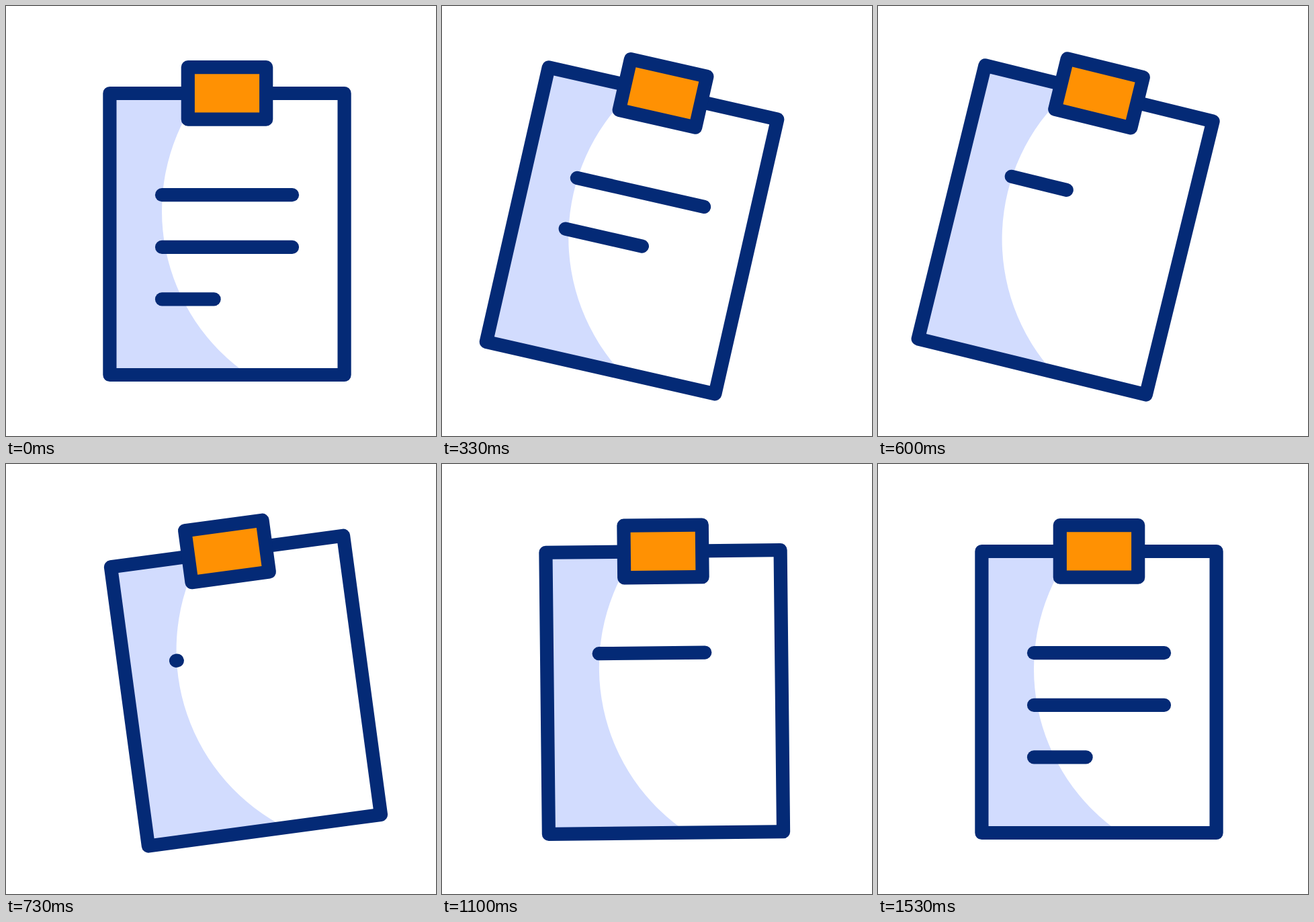
Recreate the animation shown at these times as an HTML page. Size 640 by 640 pixels, loop 2 s.

```html
<!DOCTYPE html>
<html lang="en">
<head>
<meta charset="utf-8">
<title>Clipboard</title>
<style>
  html, body { margin: 0; width: 100%; height: 100%; overflow: hidden; background: #fff; }
  svg { display: block; width: 100vw; height: 100vh; }
  .ink { stroke: #042a76; stroke-width: 20.2; stroke-linecap: round; stroke-linejoin: round; }
</style>
</head>
<body>
<svg viewBox="0 0 640 640">
  <defs>
    <clipPath id="sheet"><rect x="154.4" y="130" width="349.2" height="419"/></clipPath>
  </defs>
  <g id="board">
    <g clip-path="url(#sheet)">
      <rect x="154" y="130" width="350" height="419" fill="#d2dcfe"/>
      <circle cx="527.6" cy="305" r="295.6" fill="#fff"/>
    </g>
    <rect class="ink" x="154.4" y="130" width="349.2" height="419" fill="none"/>
    <rect class="ink" x="270.8" y="91.1" width="116.4" height="77.6" fill="#ff9103"/>
    <line class="ink" x1="232" y1="281.2" x2="426" y2="281.2"/>
    <line class="ink" x1="232" y1="358.8" x2="426" y2="358.8"/>
    <line class="ink" x1="232" y1="436.4" x2="309.6" y2="436.4"/>
  </g>
</svg>
<script>
const LOOP = 2000, FPS = 30, LEFT = 232;
const board = document.getElementById('board');
const lines = board.querySelectorAll('line');

// cubic-bezier(x1, 0, x2, 1), solved by bisection
function bezier(x1, x2) {
  return x => {
    let lo = 0, hi = 1, u = x;
    for (let i = 0; i < 24; i++) {
      u = (lo + hi) / 2;
      const bx = 3 * x1 * u * (1 - u) ** 2 + 3 * x2 * u * u * (1 - u) + u ** 3;
      if (bx < x) lo = u; else hi = u;
    }
    return u * u * (3 - 2 * u);
  };
}
const swingEase = bezier(0.415, 0.6);
const trimEase = bezier(1 / 3, 2 / 3);

// [time, value] steps
const swing = [[0, 0], [533, 18.4], [767, -8.9], [967, 4.9], [1167, -2.4], [1367, 1.3], [1533, 0]];
const trims = [
  { full: 194, steps: [[419, 1], [752, 0], [786, 0], [1220, 1]] },
  { full: 194, steps: [[190, 1], [523, 0], [1100, 0], [1433, 1]] },
  { full: 77.6, steps: [[0, 1], [333, 0], [1267, 0], [1533, 1]] }
];

function valueAt(steps, t, ease) {
  if (t <= steps[0][0]) return steps[0][1];
  for (let i = 1; i < steps.length; i++) {
    const [t0, a] = steps[i - 1], [t1, b] = steps[i];
    if (t < t1) return a + (b - a) * ease((t - t0) / (t1 - t0));
  }
  return steps[steps.length - 1][1];
}

function draw(now) {
  // motion runs in steps of 1/30 s
  const t = Math.floor((now % LOOP + 3.4) * FPS / 1000) * 1000 / FPS % LOOP;
  board.setAttribute('transform', `rotate(${valueAt(swing, t, swingEase).toFixed(3)} 329 130)`);
  trims.forEach(({ full, steps }, i) => {
    const part = valueAt(steps, t, trimEase);
    lines[i].setAttribute('x2', LEFT + full * part);
    lines[i].setAttribute('visibility', part > 0.001 ? 'visible' : 'hidden');
  });
}

const start = performance.now();
function tick() {
  draw(performance.now() - start);
  requestAnimationFrame(tick);
}
tick();
</script>
</body>
</html>
```
